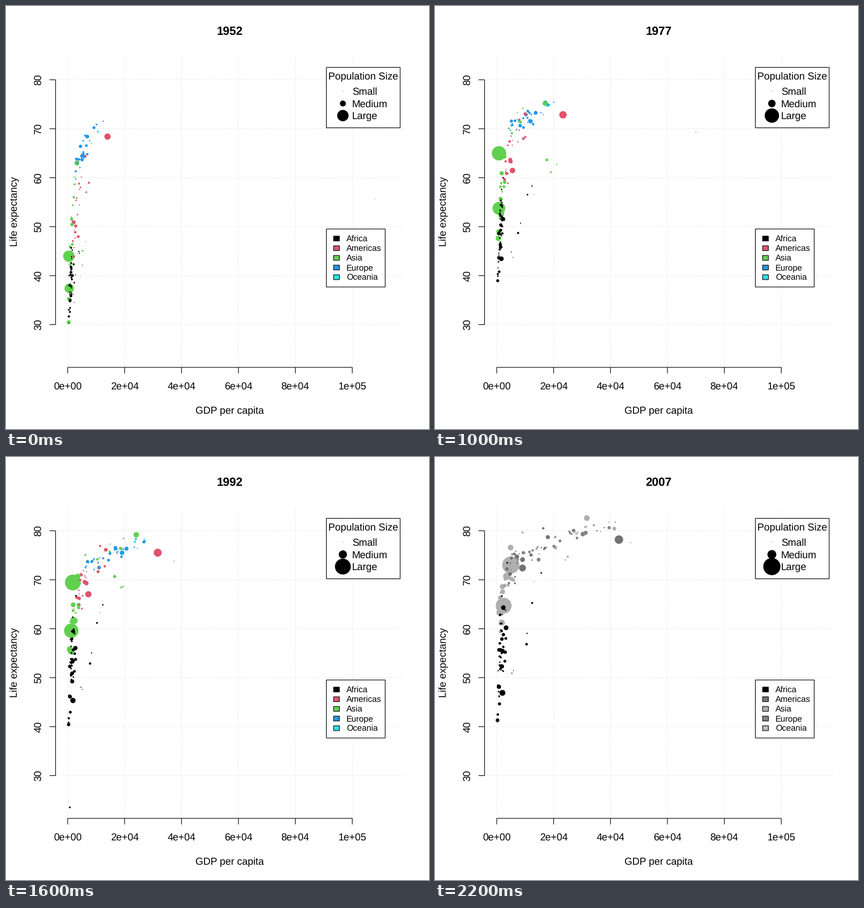
Recreate the animation shown at these times as a matplotlib script. Size 748 px wide and 748 px high, loop 2400 ms.

```python
import numpy as np
import matplotlib.pyplot as plt
from matplotlib.animation import FuncAnimation
from matplotlib.patches import Rectangle

SIZE, DPI = 748, 88
PT = 72 / DPI                 # points per pixel
INCH = SIZE / 7               # the plot is laid out on a 7 inch page
EM = INCH / 6                 # 12 point text
ROW = INCH / 5                # one margin line
LW = INCH / 96 * PT
LEFT, TOP = 4.1 * ROW, 4.1 * ROW
RIGHT, BOTTOM = SIZE - 2.1 * ROW, SIZE - 5.1 * ROW
MID_X, MID_Y = (LEFT + RIGHT) / 2, (TOP + BOTTOM) / 2

YEARS = np.arange(1952, 2008, 5)
U = (YEARS - 1952) / 55       # progress through the loop
COLORS = {"Africa": "#000000", "Americas": "#DF536B", "Asia": "#61D04F",
          "Europe": "#2297E6", "Oceania": "#28E2E5"}
GRAYS = {"Africa": "#000000", "Americas": "#727272", "Asia": "#AFAFAF",
         "Europe": "#848484", "Oceania": "#BBBBBB"}

plt.rcParams["font.family"] = "Liberation Sans"
plt.rcParams["text.hinting"] = "none"
rng = np.random.default_rng(12)
regions, xs, ys, rs = [], [], [], []


def px(gdp):
    return 109.1 + gdp * 0.005032


def py(life):
    return 130.5 + (80 - life) * 8.658


def ease(ends, power=1.0):
    return ends[0] + (ends[1] - ends[0]) * U ** power


def bump(year, width):
    return np.exp(-((YEARS - year) / width) ** 2)


def add(region, pop, gdp, life):
    """Population in millions, income and life expectancy over the years."""
    regions.append(region)
    xs.append(px(gdp))
    ys.append(py(life))
    rs.append(0.405 * np.sqrt(pop))


def star(region, pop, gdp, life, pace=(1, 1), dip=0, dip_year=1962):
    """A prominent bubble; income grows exponentially, pace bends both paths."""
    add(region, ease(pop), np.exp(ease(np.log(gdp), pace[0])),
        ease(life, pace[1]) - dip * bump(dip_year, 4))


def crowd(region, count, pop, gdp, life, spread, sd,
          size=1.0, pace=1.0, boom=0.0):
    """Bubbles scattered about a shared path, richer ones living longer."""
    for k in np.linspace(-1.7, 1.7, count):
        z, drift, n, m = np.clip(rng.normal(size=4), -2, 2)
        wealth = ease((z, 0.8 * z + 0.6 * drift))
        health = 0.75 * wealth + 0.65 * ease((n, 0.6 * n + 0.8 * m))
        income = np.exp(ease(np.log(gdp)) + ease(spread) * wealth
                        + boom * bump(1978, 12))
        add(region, ease(pop) * np.exp(size * k), income,
            ease(life, pace) + ease(sd) * health)


star("Asia", (556, 1319), (400, 4959), (44, 73), (1.6, 0.41), dip=14)
star("Asia", (372, 1110), (547, 2452), (37.4, 64.7), (1.9, 0.65))
star("Asia", (82, 224), (750, 3541), (37.5, 70.7))
star("Asia", (86, 127), (3217, 31656), (63, 82.6), (0.4, 0.6))
star("Americas", (158, 301), (13990, 42952), (68.4, 78.2))
star("Americas", (57, 190), (2109, 9066), (50.9, 72.4), (0.52, 0.9))
star("Africa", (33, 135), (1077, 2014), (36.3, 46.9), (0.5, 0.5))
star("Africa", (2.5, 8.9), (493, 863), (40, 46.2), dip=21, dip_year=1992)

# The one far-out bubble, which falls back after the early seventies
add("Asia", ease((0.16, 2.5)),
    np.interp(YEARS, [1952, 1967, 1972, 1982, 2007],
              [108e3, 81e3, 109e3, 31e3, 47e3]),
    ease((55.6, 77.6), 0.6))

crowd("Africa", 44, pop=(4, 13), gdp=(1000, 1350), life=(38.8, 55),
      spread=(0.45, 0.65), sd=(4.2, 7), size=1.1, pace=0.6)
crowd("Africa", 6, pop=(1, 3.5), gdp=(2800, 10000), life=(41, 59),
      spread=(0.3, 0.3), sd=(4, 8), pace=0.7, boom=0.5)
crowd("Americas", 23, pop=(4, 11), gdp=(3300, 7500), life=(53, 73.5),
      spread=(0.45, 0.5), sd=(7, 3), size=1.2, pace=0.75)
crowd("Asia", 19, pop=(10, 33), gdp=(900, 2700), life=(43.5, 68),
      spread=(0.45, 0.65), sd=(6, 5), pace=0.8)
crowd("Asia", 5, pop=(4, 12), gdp=(2000, 30000), life=(57, 80),
      spread=(0.35, 0.3), sd=(4, 1.3), size=0.8, pace=0.6)
crowd("Asia", 4, pop=(1.5, 8), gdp=(5500, 17000), life=(43, 73),
      spread=(0.4, 0.4), sd=(4, 2), pace=0.7, boom=0.6)
crowd("Europe", 16, pop=(8, 10), gdp=(7000, 32000), life=(68, 80),
      spread=(0.35, 0.2), sd=(2.4, 0.9), size=1.2)
crowd("Europe", 13, pop=(7, 9), gdp=(3500, 11000), life=(62, 75),
      spread=(0.35, 0.4), sd=(2.8, 1.7), pace=0.55)
crowd("Oceania", 2, pop=(4, 9), gdp=(10300, 29500), life=(69.2, 80.7),
      spread=(0.03, 0.15), sd=(0.2, 0.5), size=0.45)

regions, xs, ys, rs = map(np.array, (regions, xs, ys, rs))

fig = plt.figure(figsize=(SIZE / DPI, SIZE / DPI), dpi=DPI, facecolor="white")
ax = fig.add_axes([0, 0, 1, 1])
ax.set(xlim=(0, SIZE), ylim=(SIZE, 0))
ax.axis("off")


def label(x, y, text, points=12, ha="center", **kw):
    return ax.text(x, y, text, fontsize=points * EM / 12 * PT, ha=ha,
                   va="baseline", rotation_mode="anchor", zorder=6, **kw)


def stroke(x, y, **kw):
    style = dict(color="black", lw=LW, solid_capstyle="butt", zorder=2,
                 snap=False)
    ax.plot(x, y, **{**style, **kw})


def box(x, y, w, h, face="white", z=4):
    return ax.add_patch(Rectangle((x, y), w, h, fc=face, ec="black", lw=LW,
                                  zorder=z, snap=False))


def area(r):
    """Scatter size of a disc with its thin outline."""
    return (2 * (r + 0.5) * PT) ** 2


grid = dict(color="#D3D3D3", linestyle=(0, (1, 3)), zorder=1)
tick = ROW / 2

for k in range(6):
    x = px(20000 * k)
    stroke([x, x], [BOTTOM, TOP], **grid)
    stroke([x, x], [BOTTOM, BOTTOM + tick])
    label(x, BOTTOM + 1.8 * ROW, f"{k * 2}e+04" if 0 < k < 5
          else f"{k // 5}e+0{k}")
    life = 30 + 10 * k
    y = py(life)
    stroke([LEFT, RIGHT], [y, y], **grid)
    stroke([LEFT - tick, LEFT], [y, y])
    label(LEFT - 1.2 * ROW, y, str(life), rotation=90)
stroke([px(0), px(1e5)], [BOTTOM, BOTTOM])
stroke([LEFT, LEFT], [py(30), py(80)])
label(MID_X, BOTTOM + 3.8 * ROW, "GDP per capita")
label(LEFT - 3.2 * ROW, MID_Y, "Life expectancy", rotation=90)
title = label(MID_X, 51.2, "", points=14, weight="bold")

box(566.5, 108.5, 130.5, 5 * ROW)
label(631.5, 129.3, "Population Size")
key_y = 151 + ROW * np.arange(3)
for y, name in zip(key_y, ["Small", "Medium", "Large"]):
    label(612, y + 6.3, name, ha="left")
sizes = ax.scatter([595.7] * 3, key_y, c="black", linewidths=0, zorder=5)

box(566.5, 394.3, 104, 4.8 * ROW)
swatches = {}
for k, name in enumerate(COLORS):
    y = 411.2 + 0.8 * ROW * k
    swatches[name] = box(579.3, y - 0.2 * ROW, 10.3, 0.4 * ROW, z=5)
    label(602, y + 5.2, name, points=10, ha="left")

bubbles = ax.scatter(xs[:, 0], ys[:, 0], linewidths=0, zorder=3)


def draw(i):
    palette = GRAYS if YEARS[i] == 2007 else COLORS
    order = np.argsort(-rs[:, i], kind="stable")
    bubbles.set_offsets(np.column_stack([xs[order, i], ys[order, i]]))
    bubbles.set_sizes(area(rs[order, i]))
    bubbles.set_facecolors([palette[r] for r in regions[order]])
    for name, patch in swatches.items():
        patch.set_facecolor(palette[name])
    sizes.set_sizes(area(rs[:, i].max() * np.array([0, 0.5, 1])))
    title.set_text(str(YEARS[i]))
    return bubbles, sizes, title


anim = FuncAnimation(fig, draw, frames=len(YEARS), interval=200, repeat=True)
plt.show()
```
